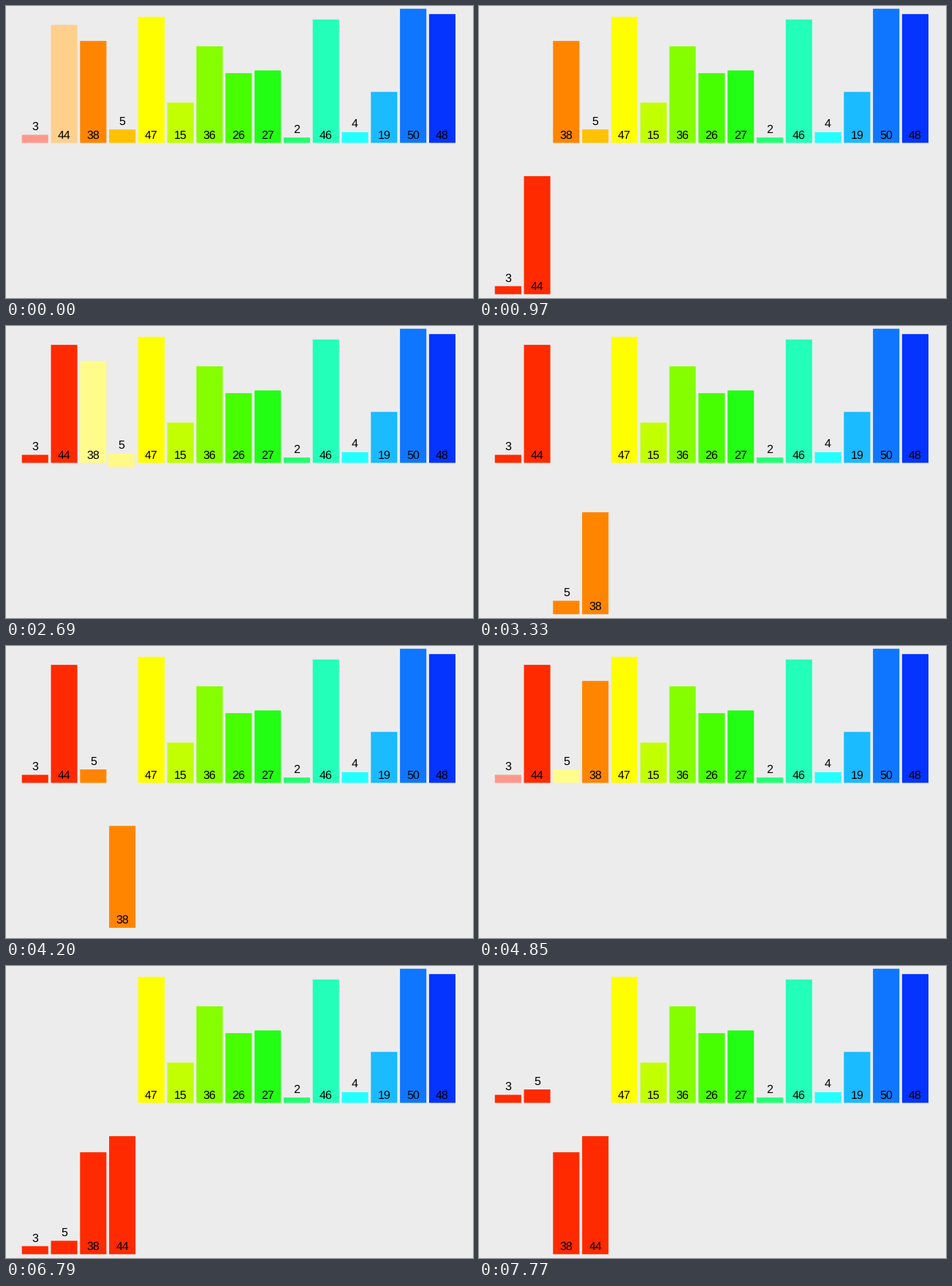
Write a matplotlib script that moves like this. It is 639 px wide and 400 px high and loops after 8 s.

```python
import numpy as np
import matplotlib.pyplot as plt
from matplotlib.animation import FuncAnimation
from matplotlib.patches import Rectangle

plt.rcParams["text.hinting"] = "none"

W, H, DPI = 639, 400, 100
LOOP_MS, STEP_MS = 8000, 20
TICK_MS = 107.7             # the picture only changes on this beat
SPAN = 1.6                  # ticks one step takes

LEFT, PITCH, BAR_W = 21.7, 39.8, 36.1
UNIT = 3.675                # pixels per unit of value
BASE, DROP = 187.5, 207.3   # upper baseline and distance to the lower one
FONT_PX = 16

VALUES = [3, 44, 38, 5, 47, 15, 36, 26, 27, 2, 46, 4, 19, 50, 48]

# when each step of the sort starts, in ticks
STARTS = [-2, 0.8, 7.4, 11.7, 16.4,
          20.4, 24.7, 29.4, 33.35, 38.65,
          43.4, 47.4, 51.7, 57.4, 60.35, 64.65, 70.4]


def rainbow(i):
    """Colour of slot i, from red to blue."""
    stops = [0, 2, 4, 7, 8, 9, 11, 14]
    red = [255, 255, 255, 72, 34, 34, 36, 5]
    green = [42, 133, 255, 255, 255, 255, 255, 51]
    blue = [0, 0, 0, 0, 20, 113, 255, 255]
    return np.array([np.interp(i, stops, c) for c in (red, green, blue)]) / 255


def lit(color):
    """Paler version of a warm colour."""
    return np.array([1, min(0.4 + 1.2 * color[1], 0.99), 0.55])


def pack(slot, row, color):
    return np.array([slot, row, *color])


def merge(order, state, lo, mid, hi):
    """Merge two runs; yield the new bar states of every step."""
    left, right = order[lo:mid], order[mid:hi]
    group = rainbow(lo)

    def light(v):
        slot, row, *color = state[v]
        return v, pack(slot, row, lit(color))

    yield dict([light(left[0]), light(right[0])])
    for slot in range(lo, hi):
        run = min((r for r in (left, right) if r), key=lambda r: r[0])
        v = run.pop(0)
        order[slot] = v
        step = {v: pack(slot, 1, group)}
        if run:
            step.update([light(run[0])])
        yield step
    for slot in range(lo, hi):
        yield {order[slot]: pack(slot, 0, group)}


def plan():
    """Timed steps of the sort: (start tick, new states)."""
    order = list(VALUES)
    state = dict(START_STATE)
    steps = []
    for bounds in [(0, 1, 2), (2, 3, 4), (0, 2, 4)]:
        for step in merge(order, state, *bounds):
            state.update(step)
            steps.append(step)
    return list(zip(STARTS, steps))


START_STATE = {v: pack(i, 0, rainbow(i)) for i, v in enumerate(VALUES)}
PLAN = plan()


def ease(t):
    """Cubic ease in and out."""
    t = min(max(t, 0), 1)
    return 4 * t ** 3 if t < 0.5 else 1 - 4 * (1 - t) ** 3


def states_at(tick):
    now = dict(START_STATE)
    for start, step in PLAN:
        p = ease((tick - start) / SPAN)
        for v, goal in step.items():
            now[v] = now[v] * (1 - p) + goal * p
    return now


fig = plt.figure(figsize=(W / DPI, H / DPI), dpi=DPI, facecolor="#ececec")
ax = fig.add_axes([0, 0, 1, 1])
ax.set_xlim(0, W)
ax.set_ylim(H, 0)
ax.axis("off")

bars, labels = {}, {}
for v in VALUES:
    bars[v] = ax.add_patch(Rectangle((0, 0), BAR_W, v * UNIT, lw=0, snap=False))
    labels[v] = ax.text(0, 0, str(v), ha="center", va="baseline",
                        family="Liberation Sans", size=FONT_PX * 72 / DPI,
                        color="black")


def draw(frame):
    tick = ((frame + 1) * STEP_MS - 1) // TICK_MS
    for v, (slot, row, *rgb) in states_at(tick).items():
        x = LEFT + PITCH * slot
        bottom = BASE + DROP * row
        top = bottom - v * UNIT
        bars[v].set_xy((x, top))
        bars[v].set_facecolor(np.clip(rgb, 0, 1))
        # short bars carry their number above
        text_y = top - 6.3 if v < 10 else bottom - 6
        labels[v].set_position((x + BAR_W / 2, text_y))
    return [*bars.values(), *labels.values()]


anim = FuncAnimation(fig, draw, frames=LOOP_MS // STEP_MS, interval=STEP_MS,
                     repeat=True, repeat_delay=0)
plt.show()
```
